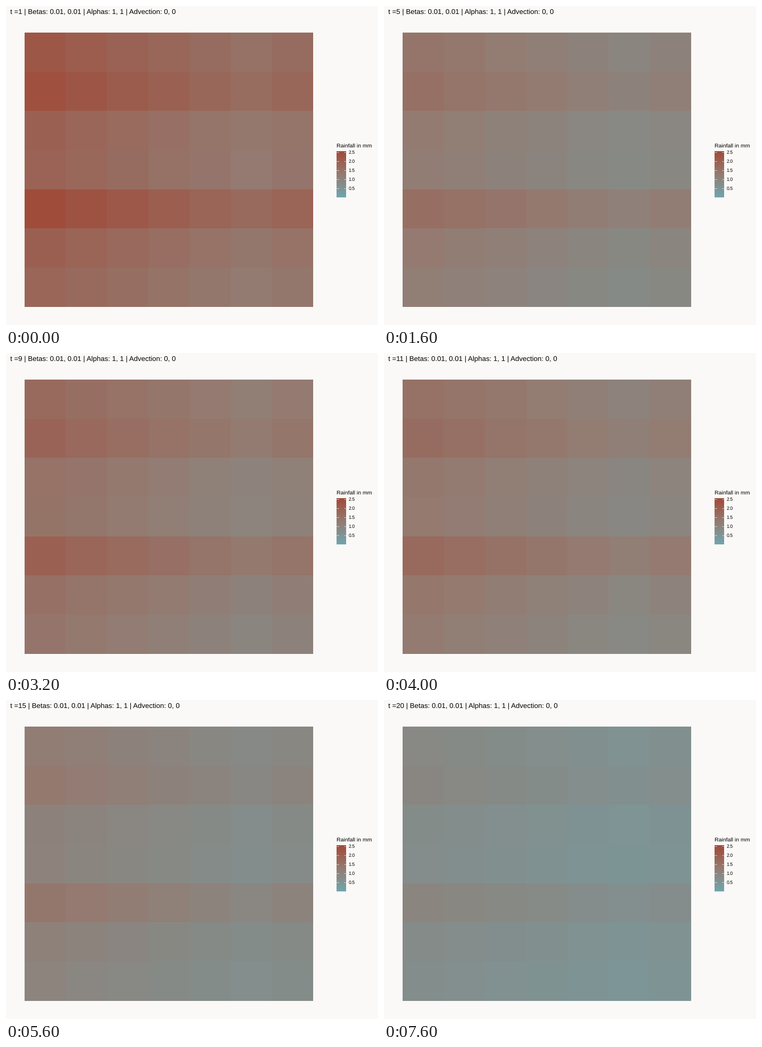
Recreate the animation shown at these times as a matplotlib script. Size 700 by 600 pixels, loop 8000 ms.

```python
import numpy as np
import matplotlib.pyplot as plt
from matplotlib.animation import FuncAnimation
from matplotlib.colors import LinearSegmentedColormap

FRAMES, INTERVAL = 20, 400
GRID = np.arange(7)
PX = 0.72  # points per pixel at 100 dpi
VMIN, VMAX = 0.03, 2.56
CMAP = LinearSegmentedColormap.from_list("rain", ["#70a5ad", "#947b71", "#a14b39"])

plt.rcParams.update({"font.family": "Liberation Sans", "text.hinting": "none"})
fig = plt.figure(figsize=(7, 6), dpi=100, facecolor="#faf9f7")
ax = fig.add_axes([0, 0, 1, 1])
ax.axis("off")


def bump(x, center, width):
    return np.exp(-(((x - center) / width) ** 2))


def intensity(t):
    """Overall rain strength: a drop, a fresh shower, then drying out."""
    if t < 6:
        return 0.64 + 0.35 / (1 + np.exp(3 * (t - 3.5)))
    if t < 12:
        return 0.89 - 0.04 * (t - 6)
    return 0.575 - 0.0029 * (t - 12) ** 2


def rainfall(t):
    rows = 1.86 + 0.62 * bump(GRID, 0.7, 1) + 0.7 * bump(GRID, 4.15, 0.72)
    columns = 0.69 + 0.062 * abs(GRID - 5)
    return np.outer(rows, columns) * intensity(t)


def label(x, y, text, size):
    return ax.text(x, y, text, fontsize=size * PX, va="baseline")


def heat(values, left, right, top, bottom):
    return ax.imshow(values, extent=(left, right, bottom, top), cmap=CMAP,
                     vmin=VMIN, vmax=VMAX, interpolation="nearest", aspect="auto")


tiles = heat(rainfall(1), 35, 578, 50, 566)
title = label(8, 15.4, "", 13.2)

label(622, 266, "Rainfall in mm", 10.5)
heat(np.linspace(VMAX, VMIN, 87)[:, None], 622, 640, 273, 360)
for value in np.arange(0.5, 3, 0.5):
    y = 360.3 - 34.2 * value
    ax.hlines([y, y], [622, 635.8], [625.5, 639.3], color="white", lw=0.7 * PX)
    label(644.8, y + 3.2, f"{value:.1f}", 8.8)

ax.set_xlim(0, 700)
ax.set_ylim(600, 0)


def update(frame):
    t = frame + 1
    tiles.set_data(rainfall(t))
    title.set_text(f"t ={t} | Betas: 0.01, 0.01 | Alphas: 1, 1 | Advection: 0, 0")
    return tiles, title


anim = FuncAnimation(fig, update, frames=FRAMES, interval=INTERVAL,
                     repeat=True, repeat_delay=0)
plt.show()
```
